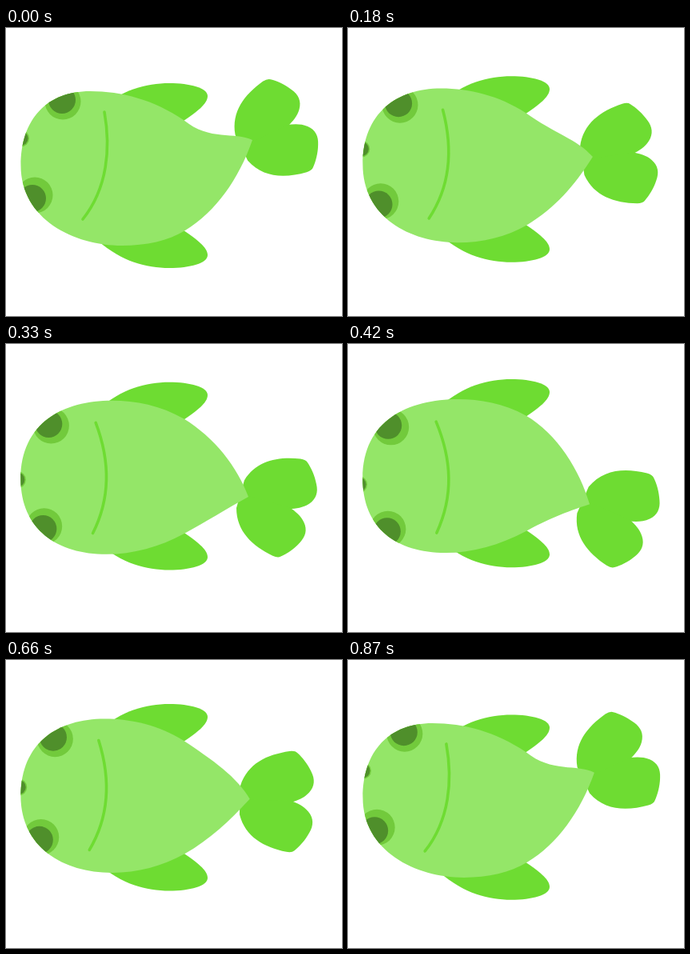
These frames come from a looping animation (420x360 px, 0.9 s). An HTML page:

```html
<!DOCTYPE html>
<html lang="en">
<head>
<meta charset="utf-8">
<title>Swimming fish</title>
<style>
  html, body { margin: 0; width: 100%; height: 100%; overflow: hidden; background: #fff; }
  svg { display: block; width: 420px; height: 360px; }
  .fin { fill: #6edc32; }
  .ring { fill: #72ca3c; }
  .pupil { fill: #4f8f2b; }
  #body { fill: #94e668; }
  #mouth { fill: none; stroke: #6edc32; stroke-width: 3.6; stroke-linecap: round; }
</style>
</head>
<body>
<svg viewBox="0 0 420 360">
  <defs>
    <path id="lobe" d="M0 1C8 -2 16 -5 22 -12C29 -20 29 -29 24 -38C19 -48 12 -56 6 -61Q3 -64 -4 -63C-32 -58 -56 -46 -64 -18V1Z"/>
    <path id="side" d="M115 34C145 8 175 0 204 0C230 0 252 6 252 16C252 26 238 36 222 47Z"/>
    <clipPath id="skin"><path id="mask"/></clipPath>
  </defs>
  <g id="tail" class="fin">
    <use href="#lobe"/>
    <use href="#lobe" transform="scale(1 -1)"/>
  </g>
  <use id="finTop" class="fin" href="#side"/>
  <use id="finLow" class="fin" href="#side"/>
  <path id="body"/>
  <g id="spots" clip-path="url(#skin)"></g>
  <path id="mouth"/>
</svg>
<script>
  const LOOP = 900, STEP = 30;
  const $ = id => document.getElementById(id);
  const set = (el, attrs) => {
    for (const name in attrs) el.setAttribute(name, attrs[name]);
  };

  // Each pair holds the pose with the tail up, then with the tail down.
  const BODY = [
    `M308 140 C286 129 255 142 222 115 C185 90 145 79 105 79 C52 79 18.5 113 18.5 172
     C18.5 239 85 272 145 272 C175 272 203 266 224 253 C262 230 291 189 308 140Z`,
    `M302 201 C290 159 262 112 222 89 C195 74 165 69 138 69 C76 69 18.3 95 18.3 168
     C18.3 230 60 261 122 261 C155 261 190 251 222 234 C250 219 270 211 302 201Z`
  ];
  const MOUTH = [
    'M123 105 C131 150 127 200 96 239',
    'M110 97 C130 145 132 190 111 236'
  ];
  // Class, radius, centre with tail up, centre with tail down.
  const SPOTS = [
    ['ring', 22.5, [71, 92], [53.5, 104]],
    ['pupil', 17, [70, 90], [50, 102]],
    ['ring', 22.5, [36, 209], [50, 231.5]],
    ['pupil', 17, [33, 213], [49, 234.5]],
    ['ring', 10.5, [18.5, 138], [13.5, 176]],
    ['pupil', 9, [18.5, 138], [13.5, 176]]
  ];

  const lerp = (a, b, k) => a + (b - a) * k;
  const morph = ([a, b], k) => {
    const ends = b.match(/[\d.]+/g);
    let i = 0;
    return a.replace(/[\d.]+/g, n => lerp(+n, +ends[i++], k).toFixed(2));
  };

  const circles = SPOTS.map(([kind, r]) => {
    const c = document.createElementNS('http://www.w3.org/2000/svg', 'circle');
    set(c, { class: kind, r });
    return $('spots').appendChild(c);
  });

  function draw(time) {
    const swing = -Math.cos(time / LOOP * 2 * Math.PI);
    const k = (swing + 1) / 2;
    const d = morph(BODY, k);
    set($('body'), { d });
    set($('mask'), { d });
    set($('mouth'), { d: morph(MOUTH, k) });
    const x = 356.5 - 4.5 * swing * swing;
    const y = 171.8 + 50 * swing;
    set($('tail'), { transform: `translate(${x} ${y}) rotate(${25 * swing - 0.8})` });
    set($('finTop'), { transform: `translate(0 ${56.3 - 12.6 * swing})` });
    set($('finLow'), { transform: `translate(0 ${289.5 - 10.6 * swing}) scale(1 -1)` });
    circles.forEach((c, i) => {
      const [, , up, down] = SPOTS[i];
      set(c, { cx: lerp(up[0], down[0], k), cy: lerp(up[1], down[1], k) });
    });
  }

  const start = performance.now();
  function tick() {
    const time = (performance.now() - start) % LOOP;
    draw(Math.floor(time / STEP) * STEP);
    requestAnimationFrame(tick);
  }
  tick();
</script>
</body>
</html>
```
